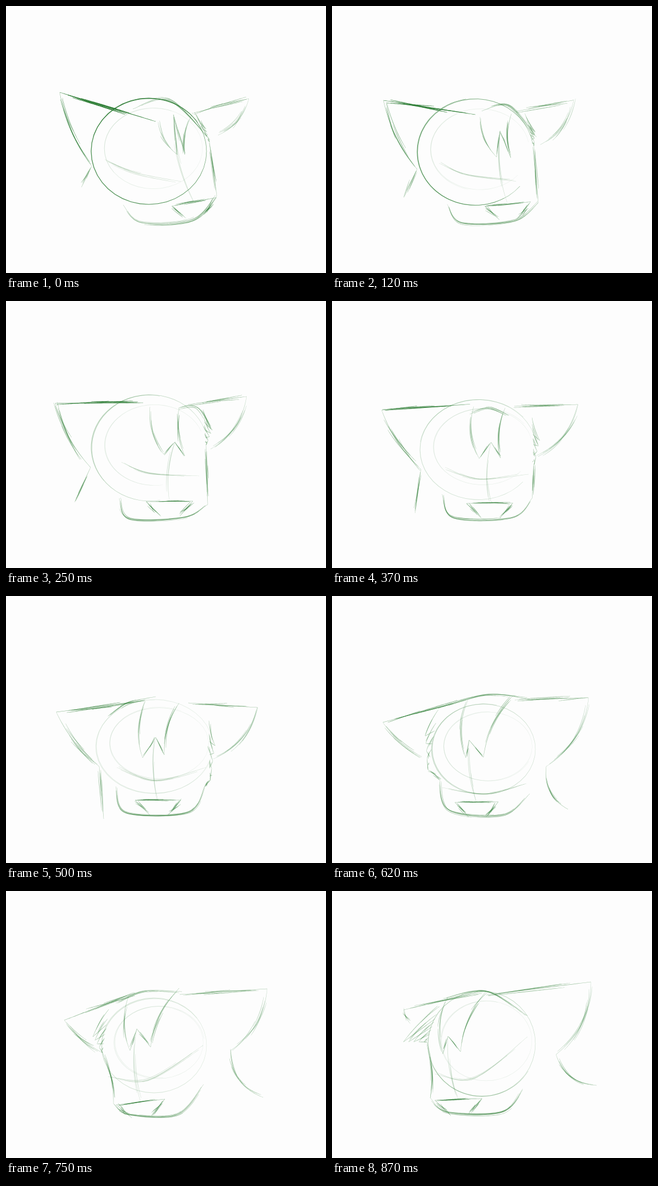
Animation, 560 px wide and 467 px high, one loop 1000 ms. Source, as an HTML page with a canvas:

```html
<!DOCTYPE html>
<html lang="en">
<head>
<meta charset="utf-8">
<title>Head turn sketch</title>
<style>
html, body { margin: 0; width: 100%; height: 100%; overflow: hidden; background: #fdfdfd; }
#stage { position: relative; width: 560px; height: 467px; overflow: hidden; }
#strip { position: absolute; left: 0; top: 0; display: block; animation: flip 1s step-end infinite; }
@keyframes flip {
  0% { transform: translateY(0); }
  12% { transform: translateY(-467px); }
  25% { transform: translateY(-934px); }
  37% { transform: translateY(-1401px); }
  50% { transform: translateY(-1868px); }
  62% { transform: translateY(-2335px); }
  75% { transform: translateY(-2802px); }
  87%, 100% { transform: translateY(-3269px); }
}
</style>
</head>
<body>
<div id="stage"><canvas id="strip" width="560" height="3736"></canvas></div>
<script>
const W = 560, H = 467;
const ctx = document.getElementById('strip').getContext('2d');

// skull: centre, radii, arc in degrees; press: skull and left ear
// ears: tip, root, base; tuft: start, end, reach
const farLeft = {
  skull: '250,254 101,93 0,360', press: '.8,.9',
  crown: '222,180 285,164 357,234', brow: '173,268 225,291 306,307',
  leftEar: '94,151 262,202 150,280', rightEar: '425,162 325,188 371,226', neck: '132,317',
  fringe: '266,203 300,260 293,190 313,260 325,190', tuft: '330,186 356,238 350,215',
  chin: '205,348 237,379 325,374 369,332', mouth: '290,350 368,335'
};
const left = {
  skull: '252,257 102,93 80,340', press: '.3,.75',
  crown: '302,187 335,186 358,224', brow: '202,282 250,301 338,306',
  leftEar: '86,179 240,178 148,291', rightEar: '421,167 319,181 358,259', neck: '120,352',
  fringe: '252,185 276,268 295,247 313,271 303,187', tuft: '345,190 350,252 361,226',
  chin: '198,345 216,380 312,378 353,356', mouth: '245,351 327,350'
};
const front = {
  skull: '260,263 102,82 0,360', press: '.12,.6',
  crown: '180,209 213,187 262,176', brow: '194,300 262,322 350,300',
  leftEar: '88,203 243,183 163,298', rightEar: '440,195 319,187 363,285', neck: '171,390',
  fringe: '244,184 239,283 262,247 277,278 303,187', tuft: '355,218 357,322 366,262',
  chin: '192,333 210,379 318,379 348,333', mouth: '226,357 306,357'
};
const right = {
  skull: '265,268 91,79 0,360', press: '.25,.55',
  crown: '185,197 270,172 352,182', brow: '192,335 270,346 340,328',
  leftEar: '89,221 235,181 157,281', rightEar: '449,178 320,182 375,298', neck: '413,373',
  fringe: '238,182 234,283 240,252 265,282 316,175', tuft: '186,199 168,304 163,245',
  chin: '188,322 206,375 300,383 346,346', mouth: '215,361 291,360'
};
const farRight = {
  skull: '259,270 92,83 0,360', press: '.18,.5',
  crown: '192,196 240,175 308,176', brow: '180,325 250,330 345,270',
  leftEar: '102,226 226,178 169,283', rightEar: '457,171 304,181 393,279', neck: '450,361',
  fringe: '215,183 217,279 229,241 253,273 303,170', tuft: '180,207 169,283 152,255',
  chin: '188,372 215,391 300,391 346,338', mouth: '193,374 278,364'
};
const profile = {
  skull: '262,267 94,92 0,360', press: '.3,.4',
  crown: '195,188 270,175 342,218', brow: '180,320 250,327 342,255',
  leftEar: '125,208 268,175 137,232', rightEar: '453,159 270,182 392,286', neck: '463,340',
  fringe: '203,185 194,285 203,254 225,281 270,175', tuft: '188,202 166,264 125,264',
  chin: '172,362 203,387 297,387 334,346', mouth: '180,366 262,363'
};

const mix = (p, q, t) => p.map((v, i) => v + (q[i] - v) * t);
const shift = ([x, y], dx, dy) => [x + dx, y + dy];

const read = pose => Object.fromEntries(Object.entries(pose).map(
  ([part, text]) => [part, text.split(' ').map(p => p.split(',').map(Number))]));

const between = (a, b) => Object.fromEntries(Object.keys(a).map(
  part => [part, a[part].map((p, i) => mix(p, b[part][i], .5))]));

function randomizer(seed) {
  return () => (seed = seed * 16807 % 2147483647) / 2147483647;
}

// paths: functions from 0..1 to a point
function curve(...pts) {
  const last = pts.length - 1;
  return u => {
    const i = Math.min(last - 1, Math.floor(u * last)), t = u * last - i;
    const [a, b, c, d] = [-1, 0, 1, 2].map(k => pts[Math.max(0, Math.min(last, i + k))]);
    return b.map((v, k) => v + t * (c[k] - a[k] + t * (2 * a[k] - 5 * v + 4 * c[k] - d[k]
      + t * (3 * (v - c[k]) + d[k] - a[k]))) / 2);
  };
}

// line from p to q, bent sideways by a share of its length
function bow(p, q, bend = 0) {
  const dx = q[0] - p[0], dy = q[1] - p[1];
  return u => {
    const k = 4 * u * (1 - u) * bend;
    return [p[0] + dx * u - dy * k, p[1] + dy * u + dx * k];
  };
}

function arc([cx, cy], [rx, ry], [from, to]) {
  return u => {
    const angle = (from + (to - from) * u) * Math.PI / 180;
    return [cx + rx * Math.cos(angle), cy + ry * Math.sin(angle)];
  };
}

// one pencil line, thinner toward its ends
function line(at, width) {
  const steps = 40, near = [], far = [];
  for (let i = 0; i <= steps; i++) {
    const [x, y] = at(i / steps);
    const p = at(Math.max(0, i - 1) / steps), q = at(Math.min(steps, i + 1) / steps);
    const dx = q[0] - p[0], dy = q[1] - p[1];
    const r = width / 2 * (.4 + .6 * Math.sin(Math.PI * i / steps)) / (Math.hypot(dx, dy) || 1);
    near.push([x - dy * r, y + dx * r]);
    far.unshift([x + dy * r, y - dx * r]);
  }
  ctx.beginPath();
  near.concat(far).forEach(p => ctx.lineTo(...p));
  ctx.fill();
}

function draw(pose, seed) {
  const rand = randomizer(seed);

  // a full line, then loose partial repeats around it
  function sketch(path, repeats, spread, alpha = .4, width = 1) {
    const wobble = () => (rand() - .5) * 2 * spread;
    ctx.fillStyle = `rgba(40, 122, 48, ${alpha})`;
    line(path, width);
    for (let n = 0; n < repeats; n++) {
      const length = .35 + rand() * .4, from = rand() * (1 - length);
      const start = [wobble(), wobble()], end = [wobble(), wobble()];
      line(t => shift(path(from + length * t), ...mix(start, end, t)), width);
    }
  }

  function ear([tip, root, base], bend, alpha, width) {
    sketch(bow(tip, root), 4, 4, alpha, width);
    sketch(bow(tip, base, bend), 6, 4.5, alpha * .6);
  }

  const { skull, press, crown, brow, leftEar, rightEar, neck, fringe, tuft, chin, mouth } = pose;
  const [skullPress, earPress] = press[0];
  const turned = tuft[0][0] < W / 2;

  const [centre, [rx, ry], span] = skull;
  sketch(arc(...skull), 1, 1.5, skullPress, 1 + skullPress * .4);
  sketch(arc(shift(centre, 8, -5), [rx * .85, ry * .76], span), 1, 2, .1);
  sketch(curve(...crown), 4, 3, .4);
  sketch(curve(...brow), 3, 3, .2);

  ear(leftEar, .06, earPress, .6 + earPress);
  ear(rightEar, -.12, .45, 1);
  sketch(bow((turned ? rightEar : leftEar)[2], neck[0], turned ? .17 : 0), 4, 3.5, .4);

  const [leftTop, leftTip, notch, rightTip, rightTop] = fringe;
  sketch(bow(leftTop, leftTip, .1), 3, 3, .35);
  sketch(bow(leftTip, notch), 2, 2, .45);
  sketch(bow(notch, rightTip), 2, 2, .45);
  sketch(bow(rightTop, rightTip, .08), 4, 3, .4);

  // spikes of side hair, shorter toward the cheek
  const [start, end, reach] = tuft;
  for (let u = 0; u < .9; u += .22) {
    const point = mix(reach, end, u);
    sketch(bow(mix(start, end, u), point, .04), 1, 3, .4);
    sketch(bow(point, mix(start, end, Math.min(1, u + .35))), 0, 0, .4);
  }

  sketch(bow(end, chin[turned ? 0 : 3], turned ? -.06 : 0), 5, 3, .4);
  sketch(curve(...chin), 7, 3, .35);

  const [lipL, lipR] = mouth;
  const drop = u => shift(mix(lipL, lipR, u), 0, 26);
  sketch(bow(lipL, lipR), 4, 2, .5, 1.1);
  sketch(bow(lipL, drop(.32)), 5, 3.5, .4);
  sketch(bow(lipR, drop(.72)), 6, 3.5, .45);
  sketch(bow(notch, mix(lipL, lipR, .5), .06), 2, 3, .2);
}

const [a, b, c, d, e, f] = [farLeft, left, front, right, farRight, profile].map(read);
ctx.fillStyle = '#fdfdfd';
ctx.fillRect(0, 0, W, H * 8);
[a, between(a, b), b, between(b, c), c, d, e, f].forEach((pose, i) => {
  ctx.setTransform(1, 0, 0, 1, 0, i * H);
  draw(pose, 4127 + i * 91193);
});
</script>
</body>
</html>
```
